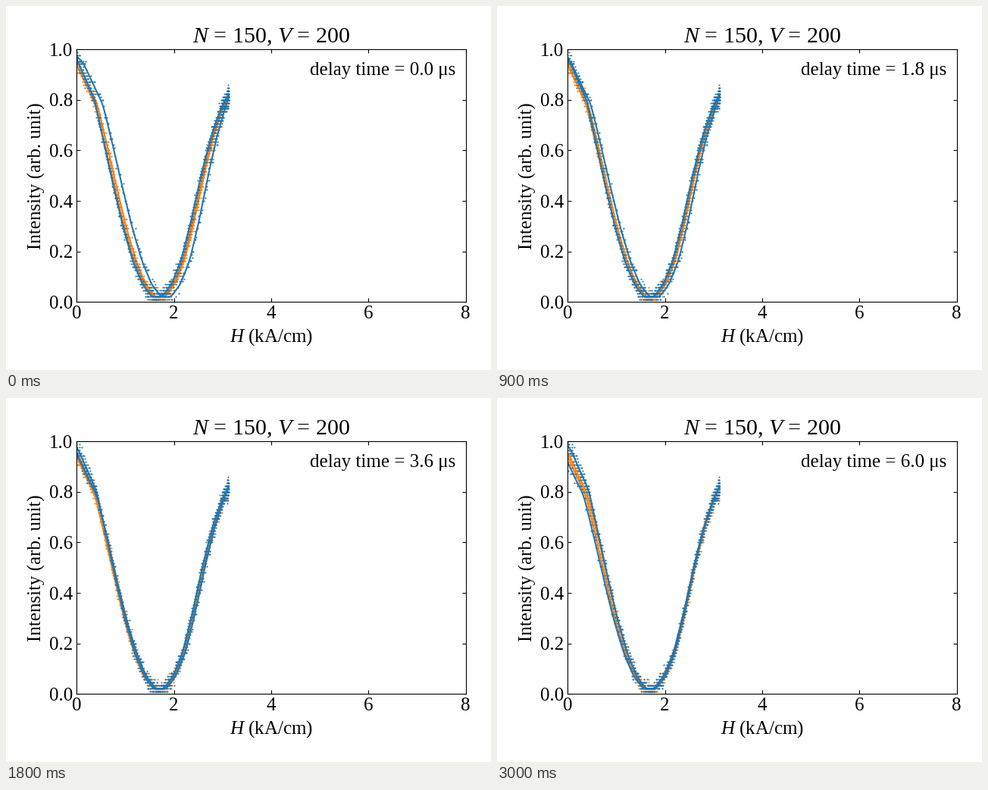
These frames come from a looping animation (640 by 480 pixels, 3.1 s). A matplotlib script:

```python
import numpy as np
import matplotlib.pyplot as plt
from matplotlib.animation import FuncAnimation

FRAMES, INTERVAL = 31, 100
PX_PER_FIELD = 64.2
H_MAX = 3.12
QUANTUM, FLOOR = 0.0118, 0.01
BLUE, ORANGE = "#1f77b4", "#ff7f0e"

plt.rcParams.update({
    "font.family": "Liberation Serif",
    "font.size": 18,
    "mathtext.fontset": "custom",
    "mathtext.rm": "Liberation Serif",
    "mathtext.it": "Liberation Serif:italic",
    "xtick.direction": "in",
    "ytick.direction": "in",
    "xtick.top": True,
    "ytick.right": True,
})

# Intensity curve: knots every 0.2 kA/cm, softened with a short window
knots = np.arange(-0.4, 3.41, 0.2)
levels = [0.97, 0.985, 0.95, 0.865, 0.785, 0.625, 0.455, 0.295, 0.163, 0.07,
          0.02, 0.02, 0.07, 0.165, 0.32, 0.5, 0.655, 0.77, 0.85, 0.9]
grid = np.linspace(-0.4, 3.4, 761)
window = np.hanning(35)
smooth = np.convolve(np.pad(np.interp(grid, knots, levels), 17, mode="edge"),
                     window / window.sum(), mode="valid")


def intensity(h, lift=0):
    """Detected light; lift raises the shoulder at weak fields."""
    return np.interp(h, grid, smooth) + lift * np.exp(-(h / 0.5) ** 4)


def sweep_rate(h):
    return np.sqrt(np.clip(1 - (h / H_MAX) ** 2, 0, 1))


def rising(h, delay):
    """Field shifted by the signal lag while the field grows."""
    return h + sweep_rate(h) * (8.2 + 1.4 * h - 2.2 * delay) / PX_PER_FIELD


def falling(h, delay):
    """Field shifted by the signal lag while the field decays."""
    return h + sweep_rate(h) * (-1.5 - 1.4 * h + 0.8 * delay) / PX_PER_FIELD


def reference(side):
    return lambda h, delay: h + side * sweep_rate(h) * 1.4 / PX_PER_FIELD


rng = np.random.default_rng(7)


def samples(count, lift):
    """Noisy digitised readings along one half of a sine pulse."""
    h = H_MAX * np.sin(np.linspace(-0.07, np.pi / 2, count))
    noisy = intensity(h, lift) + rng.normal(0, 0.0145, count)
    level = np.round((noisy - FLOOR) / QUANTUM)
    return h, np.clip(level, 0, None) * QUANTUM + FLOOR


fig = plt.figure(figsize=(6.4, 4.8), dpi=100, facecolor="white")
ax = fig.add_axes([93.2 / 640, 89.6 / 480, 513.5 / 640, 333.2 / 480])
ax.set(xlim=(0, 8), ylim=(0, 1), xticks=range(0, 9, 2))
ax.set_title("$N$ = 150, $V$ = 200")
ax.set_xlabel("$H$ (kA/cm)")
ax.set_ylabel("Intensity (arb. unit)")
label = ax.text(0.6, 0.9, "", transform=ax.transAxes)

h_line = np.linspace(-0.2, H_MAX, 400)


def add_branch(shift, color, order, count, lift=0):
    h, reading = samples(count, lift)
    dots, = ax.plot(shift(h, 0), reading, ".", ms=2.2, mew=0.3,
                    color=color, zorder=order)
    line, = ax.plot(shift(h_line, 0), intensity(h_line, lift),
                    color=color, lw=1.5, zorder=order + 0.1)
    return [(dots, h, shift), (line, h_line, shift)]


for side in (-1, 1):
    add_branch(reference(side), ORANGE, 2, 600)

# The field grows quickly and decays slowly, so fewer readings fall on the rise
traces = add_branch(rising, BLUE, 2.3, 280)
traces += add_branch(falling, BLUE, 2.3, 900, lift=0.022)


def update(frame):
    delay = 0.2 * frame
    for artist, h, shift in traces:
        artist.set_xdata(shift(h, delay))
    label.set_text(f"delay time = {delay:.1f} μs")
    return [label] + [trace[0] for trace in traces]


anim = FuncAnimation(fig, update, frames=FRAMES, interval=INTERVAL,
                     init_func=lambda: update(0), repeat=True, repeat_delay=0)
plt.show()
```
